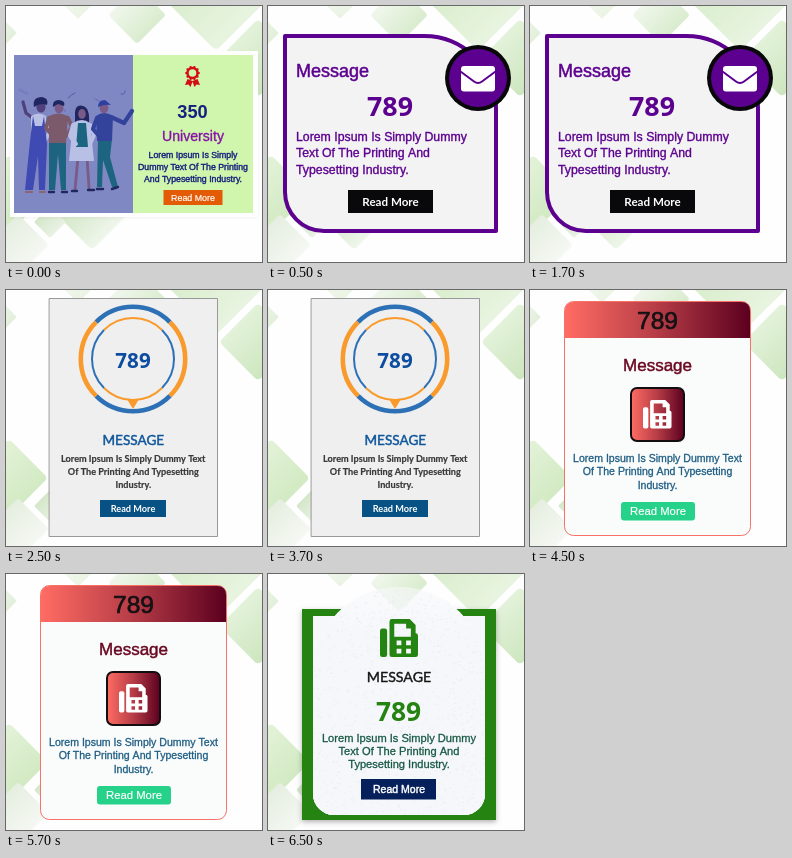
An HTML page with a canvas that plays this animation: 256x256 px, repeating every 8 s.

```html
<!DOCTYPE html>
<html lang="en">
<head>
<meta charset="utf-8">
<title>Counter cards</title>
<style>
html, body { margin: 0; width: 100%; height: 100%; overflow: hidden; background: #fdfefd; }
canvas { display: block; width: 256px; height: 256px; }
</style>
</head>
<body>
<canvas id="stage"></canvas>
<script>
const canvas = document.getElementById('stage');
const ctx = canvas.getContext('2d');
const dpr = window.devicePixelRatio || 1;
canvas.width = canvas.height = 256 * dpr;

const ARIAL = '"Liberation Sans", Arial, sans-serif';
const OPEN = '"Open Sans", sans-serif';
const LATO = 'Lato, sans-serif';

function rect(x, y, w, h, fill, radius = 0, stroke, line = 1) {
  ctx.beginPath();
  ctx.roundRect(x, y, w, h, radius);
  if (fill) { ctx.fillStyle = fill; ctx.fill(); }
  if (stroke) { ctx.strokeStyle = stroke; ctx.lineWidth = line; ctx.stroke(); }
}

function disc(x, y, r, fill, ry = r) {
  ctx.beginPath();
  ctx.ellipse(x, y, r, ry, 0, 0, Math.PI * 2);
  ctx.fillStyle = fill;
  ctx.fill();
}

function shape(d, fill) {
  ctx.fillStyle = fill;
  ctx.fill(new Path2D(d), 'evenodd');
}

function line(d, color, width) {
  ctx.strokeStyle = color;
  ctx.lineWidth = width;
  ctx.lineCap = ctx.lineJoin = 'round';
  ctx.stroke(new Path2D(d));
}

function text(str, x, y, font, color, weight = 0, align = 'center') {
  ctx.font = font;
  ctx.textAlign = align;
  ctx.fillStyle = color;
  ctx.fillText(str, x, y);
  if (weight) {
    ctx.strokeStyle = color;
    ctx.lineWidth = weight;
    ctx.lineJoin = 'round';
    ctx.strokeText(str, x, y);
  }
}

function lines(list, x, y, step, ...style) {
  list.forEach((str, i) => text(str, x, y + i * step, ...style));
}

function gradient(x0, y0, x1, y1, ...colors) {
  const g = ctx.createLinearGradient(x0, y0, x1, y1);
  colors.forEach((c, i) => g.addColorStop(i / (colors.length - 1), c));
  return g;
}

function shadow(color, blur, draw, offset = 1) {
  ctx.save();
  ctx.shadowColor = color;
  ctx.shadowBlur = blur * dpr;
  ctx.shadowOffsetY = offset * dpr;
  draw();
  ctx.restore();
}

function noise(n) {
  const v = Math.sin(n * 12.9898) * 43758.5453;
  return v - Math.floor(v);
}

function diamond(x, y, r, from, to) {
  const s = r * Math.SQRT2;
  ctx.save();
  ctx.translate(x, y);
  ctx.rotate(Math.PI / 4);
  rect(-s / 2, -s / 2, s, s, gradient(-s / 2, 0, s / 2, 0, from, to), s * 0.08);
  ctx.restore();
}

function backdrop() {
  ctx.fillStyle = '#fdfefd';
  ctx.fillRect(0, 0, 256, 256);
  diamond(72, -8, 21, '#f2f7ef', '#ebf4e5');
  diamond(131, 9, 29, '#f0f7ec', '#d9ecce');
  diamond(210, -4, 49, '#d9edcc', '#e8f4e0');
  diamond(252, 52, 39, '#e3f2da', '#cde6bf');
  diamond(-3, 27, 14, '#edf5e8', '#e2efdb');
  diamond(3, 188, 39, '#e3f2d8', '#d2eac3');
  diamond(86, 207, 37, '#cfe5c2', '#eff6eb');
  diamond(44, 216, 16, '#d4e7c9', '#e9f1e4');
  diamond(12, 239, 31, '#e5eee0', '#f5f8f3');
}

function fax(x, y, size, color) {
  ctx.save();
  ctx.translate(x, y);
  ctx.scale(size / 32, size / 32);
  rect(0, 8, 6, 24, color, 2);
  shape('M8 2Q8 0 10 0H25L30 5V12Q32 12 32 14V30Q32 32 30 32H10Q8 32 8 30Z' +
    'M12 4V15H26V8H22V4Z' +
    'M14 18H18V22H14ZM22 18H26V22H22ZM14 25H18V29H14ZM22 25H26V29H22Z', color);
  ctx.restore();
}

function award(x, y, color) {
  ctx.beginPath();
  for (let i = 0; i <= 96; i++) {
    const a = i / 96 * Math.PI * 2;
    const r = 6.7 + 0.7 * Math.cos(a * 10);
    ctx.lineTo(x + r * Math.cos(a), y + r * Math.sin(a));
  }
  ctx.closePath();
  ctx.moveTo(x + 3.8, y);
  ctx.arc(x, y, 3.8, 0, Math.PI * 2);
  ctx.fillStyle = color;
  ctx.fill('evenodd');
  shape(`M${x - 5} ${y + 6}L${x - 7.5} ${y + 12}L${x - 4} ${y + 11.6}L${x - 2} ${y + 14}L${x} ${y + 8.5}` +
    `L${x + 2} ${y + 14}L${x + 4} ${y + 11.6}L${x + 7.5} ${y + 12}L${x + 5} ${y + 6}L${x} ${y + 8}Z`, color);
}

function people() {
  const ink = '#20265f', skin = '#7a5a86', pale = '#b9c0e5', teal = '#1d6480';
  // confetti
  for (let i = 0; i < 15; i++) {
    const x = 14 + (i * 37) % 109, y = 83 + (i * 17) % 25;
    line(`M${x} ${y}l${i % 3 - 1} 1.5`, i % 2 ? '#5961a6' : '#686fae', 0.8);
  }
  line('M62 92q4 -4 7 -5M115 88q4 1 4 -3', '#4e559d', 0.9);

  // waving woman in overalls
  line('M28 113L20 107L17 96', '#50407c', 3.2);
  line('M38 113L44 125L39 135', pale, 3.6);
  shape('M25 110Q33 105 40 110L39 134H25Z', pale);
  shape('M27 110L29 120H36L38 110L41 138L39 184H33L32 150L27 184H19L24 135Z', '#3f4ab2');
  disc(35, 101, 4.6, '#50407c', 5.6);
  shape('M28 101Q26 91 36 91Q43 92 41 99Q35 96 28 101Z', ink);
  line('M20 186H26M34 186H39', '#8a6670', 2.2);

  // man in the warm shirt
  shape('M43 135H60L60 184H55L52 148L49 184H43Z', teal);
  shape('M43 110Q52 105 62 110L60 137H43Z', '#7b5a6c');
  line('M43 112L40 122L46 129M62 112L66 121L60 130', '#7b5a6c', 4);
  disc(53, 102, 4.4, skin, 5.4);
  shape('M47 101Q46 94 53 94Q60 95 58 100L52 98Z', ink);
  line('M43 186H48M56 186H61', ink, 2.4);

  // woman in the light coat
  line('M72 151L69 184M81 151L83 182', skin, 2.8);
  shape('M69 106Q70 98 77 100Q84 102 83 117L69 117Z', ink);
  shape('M67 117Q76 111 84 117L88 155H63Z', pale);
  shape('M72 117H80L82 141H70Z', teal);
  line('M67 119L64 130L70 138M84 119L88 129L84 138', pale, 4);
  disc(76, 108, 3.8, skin, 5);
  line('M66 185H71M82 184H88', ink, 2.4);

  // man with the cap
  line('M105 111L118 117L126 105', '#33429b', 4.2);
  shape('M92 133H106L104 151L112 181H106L97 154L96 181H91Z', teal);
  shape('M90 110Q98 104 107 110L106 135H91Z', '#33429b');
  line('M91 112L87 123L93 130', '#33429b', 4.2);
  disc(98, 102, 4.4, skin, 5.4);
  shape('M92 101Q92 94 99 94L105 99Q99 98 92 101Z', '#2d40a0');
  line('M91 183H97M106 183L112 181', ink, 2.4);
}

function universityCard() {
  const navy = '#17207c';
  shadow('rgba(0,0,0,.05)', 3, () => rect(4, 45, 248, 166, '#fdfefd'));
  rect(8, 49, 239, 158, '#d0f5ac');
  rect(8, 49, 119, 158, '#8088c4');
  people();
  award(186.5, 67, '#d40d12');
  text('350', 186.5, 111.5, `bold 18.2px ${ARIAL}`, navy);
  text('University', 187, 135, `14.1px ${ARIAL}`, '#8611a8', 0.35);
  lines(['Lorem Ipsum Is Simply', 'Dummy Text Of The Printing', 'And Typesetting Industry.'],
    187, 152, 12, `8.75px ${ARIAL}`, navy, 0.4);
  rect(157.5, 184, 59, 15, '#e45b05');
  text('Read More', 187, 195, `8.9px ${ARIAL}`, '#fff', 0.2);
}

function envelopeCard() {
  const purple = '#5c008f';
  rect(17, 30, 211, 195, '#f3f3f4', [0, 72, 0, 39], purple, 4);
  disc(210, 72, 33, '#08070a');
  disc(210, 72, 29, purple);
  rect(193, 60, 34, 25.5, '#fff', 3);
  line('M192.5 65.5L206 75.5Q210 78.5 214 75.5L227.5 65.5', purple, 2);
  text('Message', 28, 71, `18px ${ARIAL}`, purple, 0.5, 'left');
  text('789', 122, 110, `bold 26.8px ${OPEN}`, purple);
  lines(['Lorem Ipsum Is Simply Dummy', 'Text Of The Printing And', 'Typesetting Industry.'],
    28, 135, 16.3, `12.3px ${ARIAL}`, purple, 0.35, 'left');
  rect(80, 184, 85, 23, '#09090b');
  text('Read More', 122.5, 199.5, `bold 11.6px ${LATO}`, '#fff');
}

// Four arcs around a centre, alternating from the top
function ring(x, y, r, width, first, second) {
  ctx.lineCap = 'butt';
  ctx.lineWidth = width;
  for (let i = 0; i < 4; i++) {
    const a = (i * 2 - 3) * Math.PI / 4;
    ctx.beginPath();
    ctx.arc(x, y, r, a, a + Math.PI / 2);
    ctx.strokeStyle = i % 2 ? second : first;
    ctx.stroke();
  }
}

function ringCard() {
  const blue = '#2d70b5', orange = '#f99a2c', x = 127, y = 69;
  rect(43.5, 8.5, 168, 238, '#efefef', 0, '#999', 1);
  ring(x, y, 52.2, 4.6, blue, orange);
  ring(x, y, 41, 2, orange, blue);
  shape('M121.5 110H132.5L127 119Z', orange);
  text('789', x, 77.5, `bold 20.6px ${OPEN}`, '#0c4da0');
  text('MESSAGE', 127.3, 154.5, `13.6px ${LATO}`, '#0d559b', 0.45);
  lines(['Lorem Ipsum Is Simply Dummy Text', 'Of The Printing And Typesetting', 'Industry.'],
    127.3, 172, 13, `bold 9.15px ${LATO}`, '#393939', 0.2);
  rect(94, 210, 66, 17, '#075184');
  text('Read More', x, 222, `bold 9.2px ${LATO}`, '#fff');
}

function redCard() {
  const fade = ['#ff6c63', '#b53c46', '#5c001f'];
  rect(34.5, 11.5, 186, 234, '#fafbfb', 9, '#f77168', 1);
  rect(35, 12, 185, 36, gradient(35, 0, 220, 0, ...fade), [8, 8, 0, 0]);
  text('789', 127.5, 38.5, `24.6px ${ARIAL}`, '#161114', 0.7);
  text('Message', 127.5, 80.5, `17px ${ARIAL}`, '#690820', 0.45);
  rect(101, 98, 53, 53, gradient(101, 0, 154, 0, ...fade), 6, '#120d10', 2);
  fax(113, 110, 28.5, '#fff');
  lines(['Lorem Ipsum Is Simply Dummy Text', 'Of The Printing And Typesetting', 'Industry.'],
    127.5, 172, 13.3, `10.55px ${ARIAL}`, '#1d5d83', 0.3);
  rect(91, 212, 74, 18.5, '#26d28a', 3);
  text('Read More', 128, 225, `11.3px ${ARIAL}`, '#fff', 0.2);
}

function greenCard() {
  const green = '#258312';
  shadow('rgba(0,0,0,.3)', 5, () => rect(34, 35, 194, 211, green), 2);
  rect(45, 42, 172, 199, '#f6f7fa', [0, 0, 21, 21]);
  // translucent dome over the backdrop, with paper grain
  ctx.save();
  ctx.beginPath();
  ctx.roundRect(45, 13, 172, 228, [86, 86, 21, 21]);
  ctx.clip();
  backdrop();
  rect(45, 13, 172, 228, gradient(0, 13, 0, 60, 'rgba(247,248,251,.6)', '#f6f7fa'));
  ctx.fillStyle = 'rgba(226,229,240,.55)';
  for (let i = 0; i < 900; i++) {
    ctx.fillRect(45 + noise(i + 1) * 172, 13 + noise(i + 2000) * 228, 1.6, 1);
  }
  ctx.restore();
  fax(112, 45, 38, green);
  text('MESSAGE', 131, 108, `14.2px ${LATO}`, '#151515', 0.4);
  text('789', 130.5, 146.5, `bold 26.4px ${OPEN}`, green);
  lines(['Lorem Ipsum Is Simply Dummy', 'Text Of The Printing And', 'Typesetting Industry.'],
    131, 167.5, 13.3, `11.1px ${ARIAL}`, '#175943', 0.3);
  rect(93, 205, 75, 20.5, '#05205a');
  text('Read More', 131, 219, `10.5px ${ARIAL}`, '#fff', 0.45);
}

const LOOP = 8000;
const scenes = [
  [0, universityCard],
  [500, envelopeCard],
  [2500, ringCard],
  [4500, redCard],
  [6500, greenCard]
];
const start = performance.now();
let shown;

function tick(now) {
  const t = Math.max(0, now - start) % LOOP;
  const draw = scenes.findLast(([at]) => t >= at)[1];
  if (draw !== shown) {
    ctx.setTransform(dpr, 0, 0, dpr, 0, 0);
    backdrop();
    draw();
    shown = draw;
  }
  requestAnimationFrame(tick);
}
tick(start);
</script>
</body>
</html>
```
